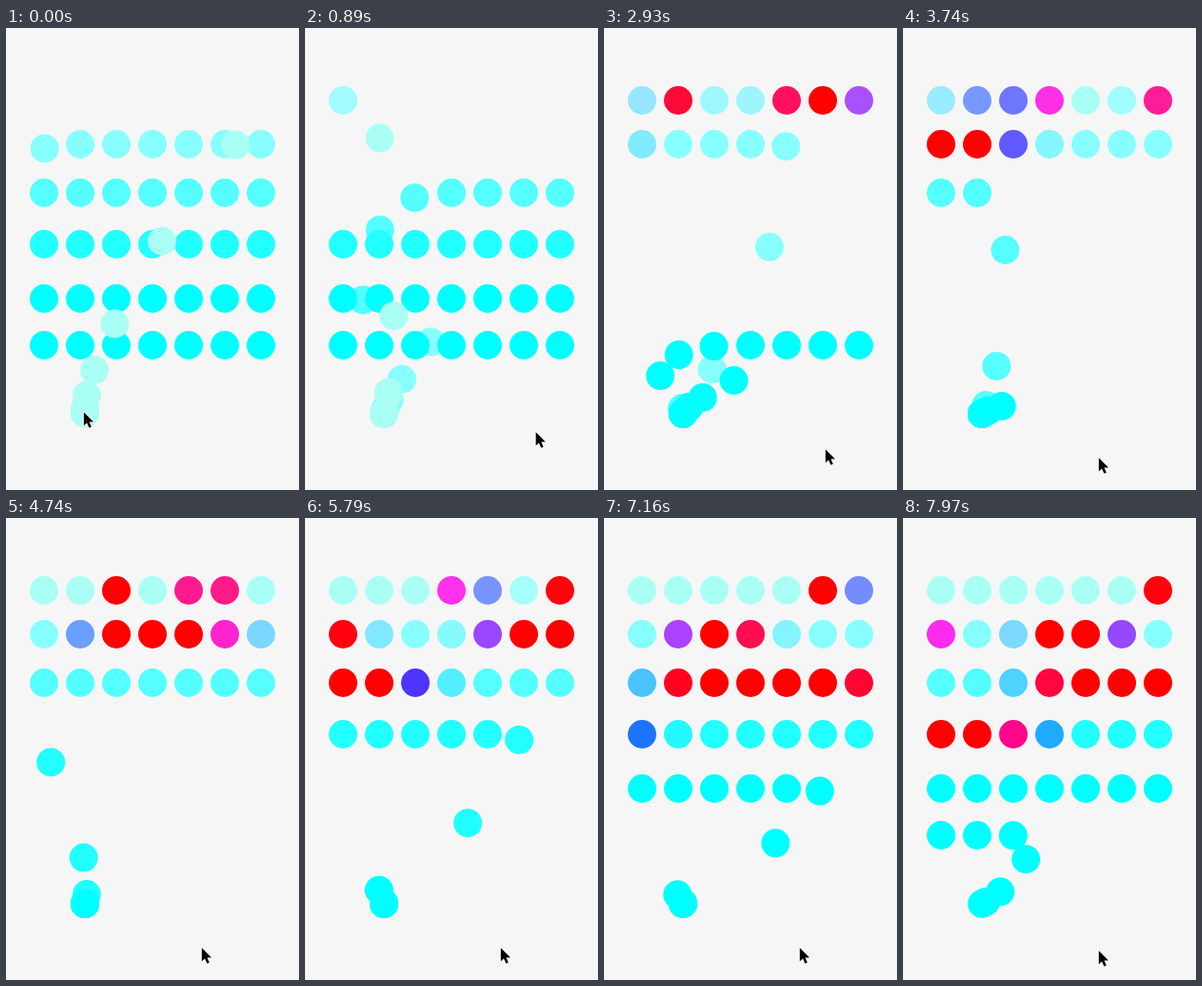
Recreate the animation shown at these times as an HTML page with a canvas. Size 308 px wide and 485 px high, loop 8000 ms.

```html
<!DOCTYPE html>
<html lang="en">
<head>
<meta charset="utf-8">
<title>Dot waves</title>
<style>
  html, body { margin: 0; width: 100%; height: 100%; overflow: hidden; background: #f6f6f6; }
  canvas { display: block; width: 308px; height: 485px; }
</style>
</head>
<body>
<canvas id="stage"></canvas>
<script>
const LOOP = 8000, MOVE = 780, RADIUS = 15, COLUMNS = 7;
const HOME = { x: 83, y: 405 };
const ROWS = [
  { y: 76, hue: 172, light: 83.3 },
  { y: 122, hue: 180, light: 76.7 },
  { y: 173, hue: 180, light: 66.7 },
  { y: 227, hue: 180, light: 56.7 },
  { y: 284, hue: 180, light: 50 },
  { y: 333, hue: 180, light: 50 }
];

// Each wave reaches dot k at start + step * k.
const LEAVE = { start: -746, step: 97.7 };
const RETURN = { start: 66, step: 193.5 };
const PULSES = [
  [{ start: 668, step: 291.2 }, { start: 1234, step: 389 }],
  [{ start: 1735, step: 478 }, { start: 2252, step: 580 }],
  [{ start: 2633, step: 682 }, { start: 3248, step: 777 }]
];

// Pointer stops: time, x, y
const POINTER = [
  [0, 81, 402], [120, 84, 403], [780, 240, 422], [1200, 247, 426], [1710, 247, 427],
  [2460, 243, 432], [2930, 232, 441], [3300, 208, 450], [3450, 205, 450],
  [7200, 205, 450], [7440, 205, 452], [7600, 205, 453], [LOOP, 205, 453]
];

const canvas = document.getElementById('stage');
const ctx = canvas.getContext('2d');
const ratio = window.devicePixelRatio || 1;
canvas.width = 308 * ratio;
canvas.height = 485 * ratio;
ctx.scale(ratio, ratio);

const mix = (a, b, p) => a + (b - a) * p;

// cubic-bezier(.4, 0, .2, 1)
function ease(t) {
  if (t <= 0) return 0;
  if (t >= 1) return 1;
  let low = 0, high = 1, s = 0.5;
  for (let i = 0; i < 20; i++) {
    s = (low + high) / 2;
    const x = 1.2 * s * (1 - s) ** 2 + 0.6 * s * s * (1 - s) + s ** 3;
    if (x < t) low = s; else high = s;
  }
  return 3 * s * s - 2 * s ** 3;
}

const age = (wave, k, time) => (time - wave.start - wave.step * k) / MOVE;
const forward = (wave, k, time) => ease(age(wave, k, time));
const backward = (wave, k, time) => 1 - ease(1 - age(wave, k, time));

function drawDot(k, time) {
  const row = ROWS[Math.floor(k / COLUMNS)];
  const away = forward(LEAVE, k, time) - backward(RETURN, k, time);
  let red = 0;
  for (const [rise, fall] of PULSES) {
    red += Math.max(0, backward(rise, k, time) - forward(fall, k, time));
  }
  red = Math.min(1, red);
  ctx.fillStyle = `hsl(${mix(row.hue, 360, red)}, 100%, ${mix(row.light, 50, red)}%)`;
  ctx.beginPath();
  ctx.arc(mix(40 + 38 * (k % COLUMNS), HOME.x, away), mix(row.y, HOME.y, away), RADIUS, 0, 2 * Math.PI);
  ctx.fill();
}

const arrow = new Path2D('M0 0V14.2L3.2 11.2L5.6 16.6L8 15.6L5.7 10.3H10.2Z');

function drawPointer(time) {
  const i = POINTER.findIndex(stop => stop[0] > time);
  const [t0, x0, y0] = POINTER[i - 1], [t1, x1, y1] = POINTER[i];
  const p = (time - t0) / (t1 - t0);
  ctx.save();
  ctx.translate(mix(x0, x1, p) + 0.8, mix(y0, y1, p) + 1.2);
  ctx.lineWidth = 2;
  ctx.lineJoin = 'round';
  ctx.strokeStyle = '#fff';
  ctx.stroke(arrow);
  ctx.fillStyle = '#000';
  ctx.fill(arrow);
  ctx.restore();
}

function draw(now) {
  const time = Math.max(0, now) % LOOP;
  ctx.fillStyle = '#f6f6f6';
  ctx.fillRect(0, 0, 308, 485);
  // The top row lies above all the others.
  for (let k = COLUMNS; k < COLUMNS * ROWS.length; k++) drawDot(k, time);
  for (let k = 0; k < COLUMNS; k++) drawDot(k, time);
  drawPointer(time);
}

let begin;
function tick(now) {
  begin ??= now;
  draw(now - begin);
  requestAnimationFrame(tick);
}
draw(0);
requestAnimationFrame(tick);
</script>
</body>
</html>
```
